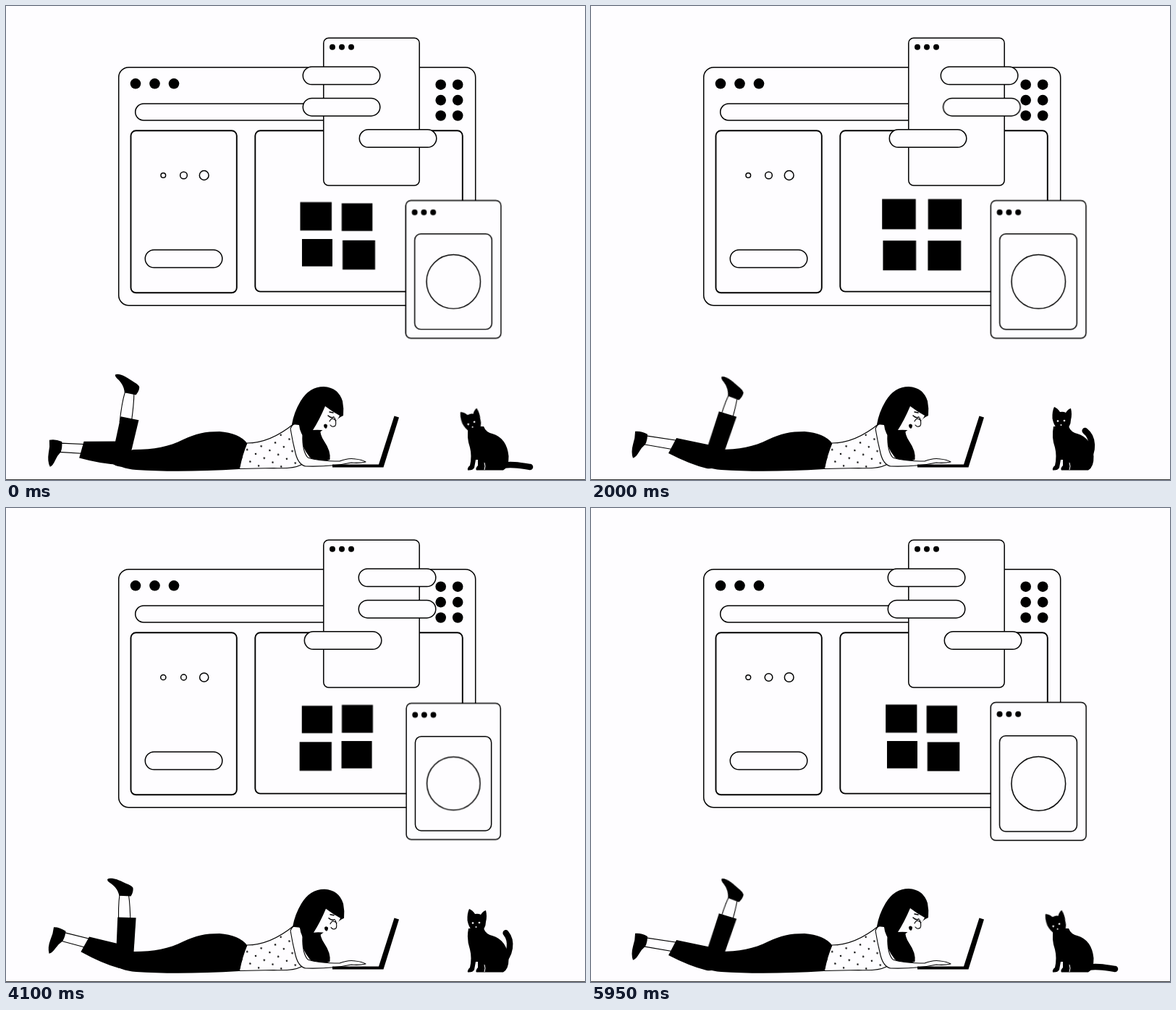
Write an HTML page that moves like this. It is 800x655 px and loops after 6 s.

```html
<!DOCTYPE html>
<html lang="en">
<head>
<meta charset="utf-8">
<title>Evening online</title>
<style>
  :root {
    --paper: #fefdff;
    --sine: cubic-bezier(.37, 0, .63, 1);
    --cubic: cubic-bezier(.65, 0, .35, 1);
  }
  html, body { margin: 0; width: 100%; height: 100%; overflow: hidden; background: var(--paper); }
  svg { display: block; width: 800px; height: 655px; }
  .line { fill: var(--paper); stroke: #000; stroke-width: 1.5; stroke-linejoin: round; stroke-linecap: round; }
  .thin { stroke-width: 1.1; }
  .bold { stroke-width: 1.9; }
  .open { fill: none; }

  /* one slide, shared by the three pills with a lag */
  .pill { animation: slide 6s var(--cubic) infinite; }
  @keyframes slide {
    0%, 20.3%, 88.6%, 100% { transform: none; }
    37%, 72% { transform: translateX(var(--shift)); }
  }

  .ring { animation: swell .5s var(--sine) infinite alternate; }
  @keyframes swell { from { r: 3.3px; } to { r: 6.4px; } }

  /* tiles grow away from their common centre */
  .tile { transform-box: fill-box; transform-origin: center; animation: grow .75s var(--sine) infinite alternate; }
  @keyframes grow {
    to { transform: translate(calc(var(--x) * 4.6px), calc(var(--y) * 4.8px)) scale(1.11); }
  }

  /* nested scales: frame, panel, disc follow each other */
  .breathe { transform-origin: 618px 381px; animation: breathe 2s var(--sine) infinite; }
  @keyframes breathe {
    0%, 92%, 100% { transform: none; }
    39%, 45% { transform: scale(var(--small)); }
  }

  /* the kick: --up lifts both feet, --low stretches them between lifts */
  .shin {
    transform: translate(calc(var(--low) * -13px), calc(var(--low) * -3px))
      rotate(calc(17deg - 38deg * var(--up) - 9deg * var(--low)));
  }
  .cuff { transform: translate(calc(var(--low) * 2px), calc(var(--low) * 10px)) rotate(calc(var(--low) * 3deg)); }
  .backFoot, .backThigh { transform-origin: 162px 623px; }
  .backFoot {
    transform: translate(calc(var(--low) * 2px), calc(var(--low) * 1px))
      rotate(calc(29deg * var(--up) - 6deg * var(--low)));
  }
  .backThigh {
    transform: translate(calc(var(--low) * -6px), calc(var(--low) * -5px))
      rotate(calc(29deg * var(--up) - 12deg * var(--low)));
  }
  .head { transform: translate(calc(var(--up) * 3.2px), calc(var(--up) * 2.2px)); }

  .catHead { transform-origin: 650px 572px; animation: look 6s var(--sine) infinite; }
  @keyframes look {
    0%, 3%, 88%, 100% { transform: translate(-7px, 3px) rotate(-18deg); }
    13%, 14.5% { transform: translate(1px, 4px) rotate(2deg); }
    20%, 78% { transform: translate(0, 0) rotate(0deg); }
  }
  .tail { fill: none; stroke: #000; stroke-width: 8.5; stroke-linecap: round; animation: wag 6s var(--sine) infinite; }
  @keyframes wag {
    0%, 14.2%, 88.5%, 100% { d: path("M680 636C695 632 712 635 724 637"); }
    21.5%, 59.2% { d: path("M684 630C696 614 688 600 685 583"); }
    32%, 63% { d: path("M684 630C695 615 694 596 682 587"); }
    45%, 76.5% { d: path("M682 630C703 622 711 603 707.5 588"); }
  }
</style>
</head>
<body>
<svg id="scene" viewBox="0 0 800 655">
  <defs>
    <pattern id="spots" width="20" height="17" patternUnits="userSpaceOnUse" patternTransform="rotate(-14)">
      <circle cx="5" cy="4" r="1.2"/>
      <circle cx="15" cy="12.5" r="1.2"/>
    </pattern>
  </defs>

  <!-- main window -->
  <rect class="line" x="155.7" y="84.7" width="493" height="329" rx="14"/>
  <g id="mainDots"></g>
  <rect class="line" x="178.7" y="135" width="300" height="23" rx="11.5"/>
  <rect class="line bold" x="172.5" y="172.3" width="146.3" height="224" rx="7"/>
  <rect class="line bold" x="344.3" y="172.3" width="286.5" height="222.3" rx="7"/>
  <rect class="line" x="192.3" y="337" width="106.5" height="24.5" rx="12.2"/>
  <g id="rings" class="line"></g>
  <g id="tiles"></g>

  <!-- floating window -->
  <rect class="line" x="438.8" y="44.2" width="132.4" height="203.8" rx="7"/>
  <g id="floatDots"></g>
  <g id="pills"></g>

  <!-- breathing window -->
  <g class="breathe" style="--small:.909; animation-delay:-.1s; transform-origin:618px 364px">
    <rect class="line" x="552.2" y="268.5" width="132" height="191" rx="7"/>
    <g id="cardDots"></g>
    <g class="breathe" style="--small:.918">
      <rect class="line" x="564.5" y="314.7" width="107" height="132.5" rx="8.5"/>
      <circle class="line breathe" style="--small:.83; animation-delay:-1.9s" cx="618.3" cy="381" r="37.4"/>
    </g>
  </g>

  <!-- back leg -->
  <g class="backFoot">
    <path class="line thin" d="M130 602L76 594L73 606L126 615Z"/>
    <path d="M61 588Q69 587 78 592Q78 600 75 606Q69 611 66 617Q62 624 58 625Q55 617 58 606Q61 597 61 588Z"/>
  </g>
  <path class="backThigh" d="M118 597L166 607A16 16 0 0 1 160 639Q136 633 107 618Z"/>

  <!-- front leg, hinged at the knee -->
  <g transform="translate(172.5 618.5)">
    <g class="shin">
      <path class="line thin" d="M-8-40Q-9-66-6.5-82H6Q8-68 8-40Z"/>
      <path d="M-23-104C-18-107-8-103-2-100C4-97 9-96 12-92C13-88 11-83 9-80L-7-81C-9-90-14-95-20-99Q-24-102-23-104Z"/>
      <path class="cuff" d="M-12.7-57H12.7L10 5Q0 16-14 8Z"/>
    </g>
  </g>

  <!-- body -->
  <path d="M150 620L176 613C205 613 225 609 245 599C262 591 275 588 295 588Q322 590 333 604L322 640Q240 645 180 641Q157 639 146 629Z"/>
  <path class="line thin" d="M333 604Q365 604 398 577L409 584L408 634Q396 640 370 638.5L322.5 639.5Q326 620 333 604Z"/>
  <path fill="url(#spots)" d="M333 604Q365 604 394 581L403 634Q396 640 370 638L323 639Q326 620 333 604Z"/>

  <!-- hair behind the arm, then the arm -->
  <path d="M398 570L434 580Q433 592 440 602Q449 615 447.5 627Q432 632 420 624Q408 610 404 585Z"/>
  <path class="line thin" d="M393 584Q396 576 403 577Q409 580 410 592Q409 615 417 624Q432 629 461 629Q473 624 483 626Q492 627 497 630Q488 632 477 631Q450 637 414 636Q404 634 400 618Q396 602 393 584Z"/>

  <g class="head">
    <path d="M395 578Q398 561 407 546Q419 526 439 526Q459 527 465 546Q467 556 466 566L462 568L432 590L416 600Q406 592 405 579Z"/>
    <path fill="var(--paper)" d="M441 553Q450 560 461 566Q459 571 456 573L458 579Q455 581 451 580Q449 586 443 587Q433 585 424 586Q433 572 441 553Z"/>
    <path class="line thin open" d="M454 569Q457 576 455 580Q451 583 448 579M456 573Q450 567 447 574"/>
    <path class="line open" d="M445 566Q449 570 453 568M447 561L452 562"/>
    <path d="M439 579Q441 576 444 579Q444 583 442 584Q439 583 439 579Z"/>
  </g>

  <!-- laptop -->
  <path d="M451 633.5H515L536.5 566.5L543 568.5L521.5 637.5H451Z"/>

  <!-- cat -->
  <path class="tail" d="M680 636C695 632 712 635 724 637"/>
  <path d="M639 581L660 581Q663 589 672 591Q692 597 694.5 622Q695 637 687 641.5H650Q648 639 652 635L652 627L649 627L647 638Q645 642 638 641.5Q637 638 641 635Q644 622 641 610Q636 596 639 581Z"/>
  <path fill="none" stroke="var(--paper)" d="M661 641Q663 636 661 631"/>
  <g class="catHead">
    <path d="M637.5 570Q637 560 640 554Q645 556 648 561Q653 560 656 562Q659 557 663 556Q665 564 663 572Q663 584 652 587Q641 587 637.5 570Z"/>
    <g fill="var(--paper)"><circle cx="645" cy="573.5" r="1.3"/><circle cx="654" cy="573" r="1.3"/><circle cx="649.5" cy="579" r="1"/></g>
  </g>

  <rect y="654" width="800" height="1" fill="#333"/>
</svg>
<script>
  const byId = id => document.getElementById(id);

  function add(id, name, attrs) {
    const el = document.createElementNS("http://www.w3.org/2000/svg", name);
    for (const key in attrs) el.setAttribute(key, attrs[key]);
    byId(id).append(el);
  }

  function dots(id, x, y, r, gapX, cols = 3, gapY = 0, rows = 1) {
    for (let i = 0; i < cols * rows; i++)
      add(id, "circle", { cx: x + gapX * (i % cols), cy: y + gapY * Math.floor(i / cols), r });
  }
  dots("mainDots", 179, 107.3, 7.3, 26.5);
  dots("mainDots", 600.7, 108.7, 7.3, 23.5, 2, 21.4, 3);
  dots("floatDots", 451, 56.7, 4, 13);
  dots("cardDots", 564.5, 284.8, 4, 12.8);

  for (let i = 0; i < 3; i++) {
    add("rings", "circle", {
      class: "ring", cx: 217.3 + 28.2 * i, cy: 234, r: 5,
      style: `animation-delay:${i * 250 - 1000}ms`
    });
    const last = i === 2;
    add("pills", "rect", {
      class: "line pill", x: last ? 488.3 : 410.3, y: 84 + 43.4 * i, width: 106.5, height: 24.5, rx: 12.2,
      style: `--shift:${last ? -76 : 77}px;animation-delay:${-120 * i}ms`
    });
  }

  // the swelling runs round the tiles: bottom right, top left, top right, bottom left
  for (let i = 0; i < 4; i++) {
    const right = i % 2, low = i >> 1;
    const turn = (i + 1) % 4;
    add("tiles", "rect", {
      class: "tile", x: 409 + 54.5 * right, y: 273.5 + 48.5 * low, width: 42, height: 37.7,
      style: `--x:${right * 2 - 1};--y:${low * 2 - 1};animation-delay:${turn * 140 - 450}ms`
    });
  }

  // two lifts per beat; the legs stretch fully on every other return
  const LOOP = 6000, BEAT = 1325;
  function kick(now) {
    const angle = 2 * Math.PI * (now % LOOP) / BEAT;
    const up = (1 - Math.cos(2 * angle)) / 2;
    const low = (1 - up) * (1 + Math.cos(angle)) / 2;
    byId("scene").style.setProperty("--up", up.toFixed(4));
    byId("scene").style.setProperty("--low", low.toFixed(4));
    requestAnimationFrame(kick);
  }
  kick(0);
</script>
</body>
</html>
```
